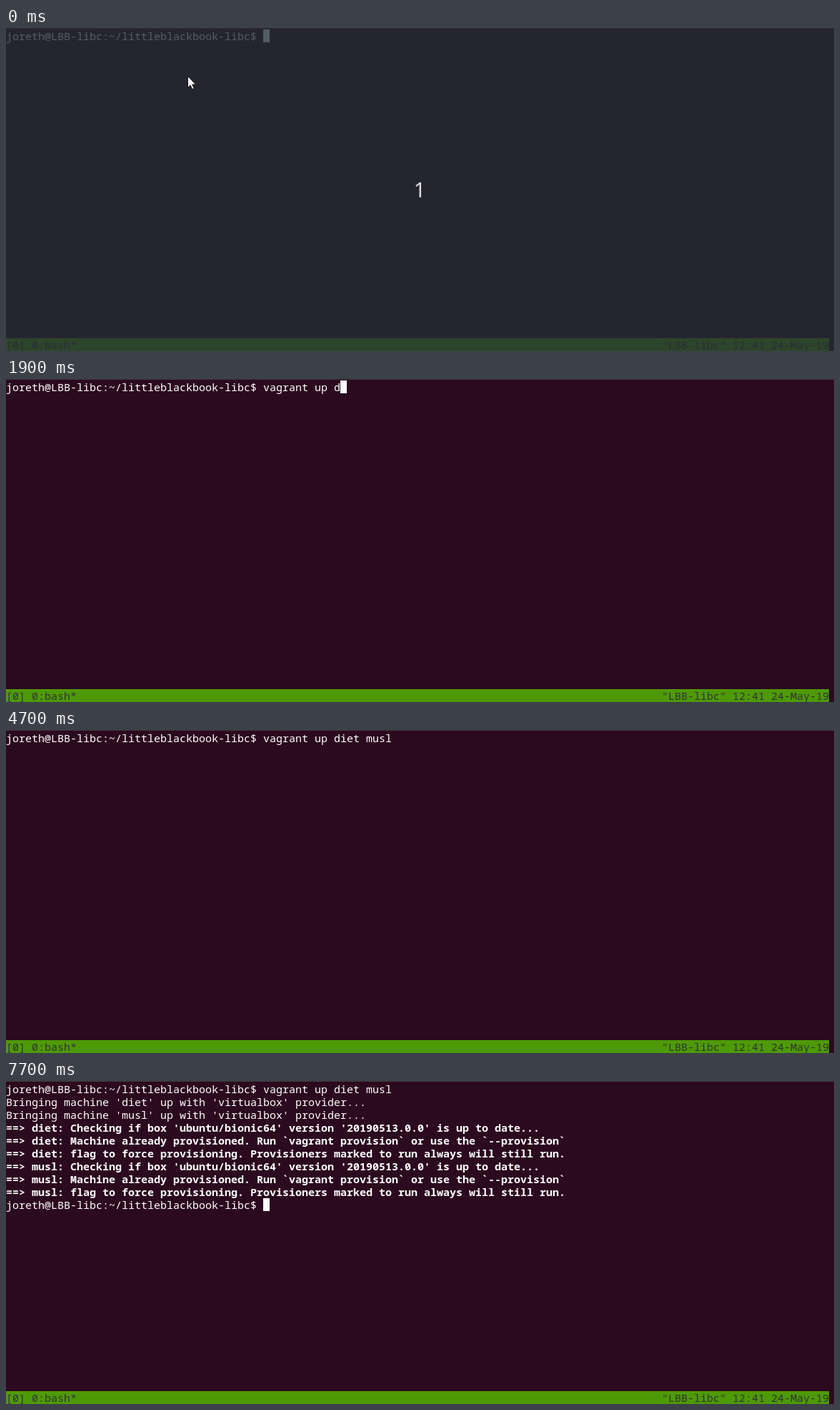
Recreate the animation shown at these times as an HTML page. Size 1159x452 px, loop 8 s.

```html
<!DOCTYPE html>
<html lang="en">
<head>
<meta charset="utf-8">
<title>Terminal session</title>
<style>
  html, body { margin: 0; width: 100%; height: 100%; overflow: hidden; background: #2b091e; }
  svg { display: block; width: 1159px; height: 452px; }
  text { white-space: pre; font: 15px "Noto Sans Mono", "Liberation Mono", monospace; fill: #fff; }
  .bold { font-weight: 700; }
  .status { fill: #2e3436; }
  .count { font: 29px "Noto Sans", "Open Sans", sans-serif; fill: #dcdcde; text-anchor: middle; }
</style>
</head>
<body>
<svg id="stage" viewBox="0 0 1159 452">
  <rect width="1159" height="452" fill="#2b091e"/>
  <rect width="1159" height="1" fill="#403b3c"/>
  <g id="rows"></g>
  <rect id="cursor" width="9" height="18" fill="#fff"/>
  <rect y="434" width="1152" height="18" fill="#4e9a06"/>
  <text class="status" x="0" y="449">[0] 0:bash*</text>
  <text class="status" x="918" y="449">"LBB-libc" 12:41 24-May-19</text>
  <g id="countdown">
    <rect width="1159" height="452" fill="#252e35" opacity=".78"/>
    <text class="count" x="579" y="237">1</text>
    <path d="M254.5 67.5v16l3.6-3.4 2.6 5.6 2.6-1.2-2.6-5.4h4.8z" fill="#fff" stroke="#111" stroke-width="1"/>
  </g>
  <path id="beam" d="M254 62.5h2M257 62.5h2M256.5 63v12M254 75.5h2M257 75.5h2" fill="none" stroke="#e8e4e6"/>
</svg>
<script>
const LOOP = 8000, CELL = 9, LINE = 18, TOP = 2, BASELINE = 15;
const PROMPT = "joreth@LBB-libc:~/littleblackbook-libc$ ";
const COMMAND = "vagrant up diet musl";

const bringUp = name => `Bringing machine '${name}' up with 'virtualbox' provider...`;
const check = name => `==> ${name}: Checking if box 'ubuntu/bionic64' version '20190513.0.0' is up to date...`;
const provisioned = name => [
  `==> ${name}: Machine already provisioned. Run \`vagrant provision\` or use the \`--provision\``,
  `==> ${name}: flag to force provisioning. Provisioners marked to run always will still run.`
];

// Output lines with the time each one is printed
const output = [
  [5100, bringUp("diet")],
  [5300, bringUp("musl")],
  [5900, check("diet")],
  ...provisioned("diet").map(line => [6500, line]),
  [7000, check("musl")],
  ...provisioned("musl").map(line => [7200, line]),
  [7200, PROMPT]
];

// [time, characters typed]
const typing = [
  [0, 0], [700, 2], [900, 4], [1000, 6], [1200, 8],
  [1500, 9], [1600, 10], [1700, 11],
  [1900, 12], [2000, 13], [2100, 14], [2200, 15],
  [2400, 16], [2500, 17], [2700, 19], [3000, 20]
];

// [time, column, row]; a missing column hides the cursor
const promptEnd = PROMPT.length;
const cursorStops = [
  [0, promptEnd, 0], [400], [500, promptEnd, 0],
  ...typing.slice(1).map(([time, count]) => [time, promptEnd + count, 0]),
  [3500, 0, 1], [4000], [4100, 0, 1], [4700],
  [5300, 0, 3], [5900], [6600, 0, 6], [7000, 0, 7],
  [7200], [7700, promptEnd, 9]
];

const byId = id => document.getElementById(id);
const show = (node, visible) => node.setAttribute("visibility", visible ? "visible" : "hidden");
const latest = (steps, time) => steps.findLast(step => step[0] <= time);

function addRow(content, row) {
  const node = document.createElementNS("http://www.w3.org/2000/svg", "text");
  node.setAttribute("y", TOP + row * LINE + BASELINE);
  if (content.startsWith("==>")) node.setAttribute("class", "bold");
  node.textContent = content;
  return byId("rows").appendChild(node);
}

const commandRow = addRow(PROMPT, 0);
const outputRows = output.map(([, content], i) => addRow(content, i + 1));
const cursor = byId("cursor"), countdown = byId("countdown"), beam = byId("beam");

function render(time) {
  commandRow.textContent = PROMPT + COMMAND.slice(0, latest(typing, time)[1]);
  outputRows.forEach((node, i) => show(node, time >= output[i][0]));

  const [, column, row] = latest(cursorStops, time);
  show(cursor, column !== undefined);
  if (column !== undefined) {
    cursor.setAttribute("x", column * CELL);
    cursor.setAttribute("y", TOP + row * LINE);
  }

  show(countdown, time < 400);
  show(beam, time >= 400 && time < 500);
}

const start = performance.now();
function tick() {
  render((performance.now() - start) % LOOP);
  requestAnimationFrame(tick);
}
tick();
</script>
</body>
</html>
```
